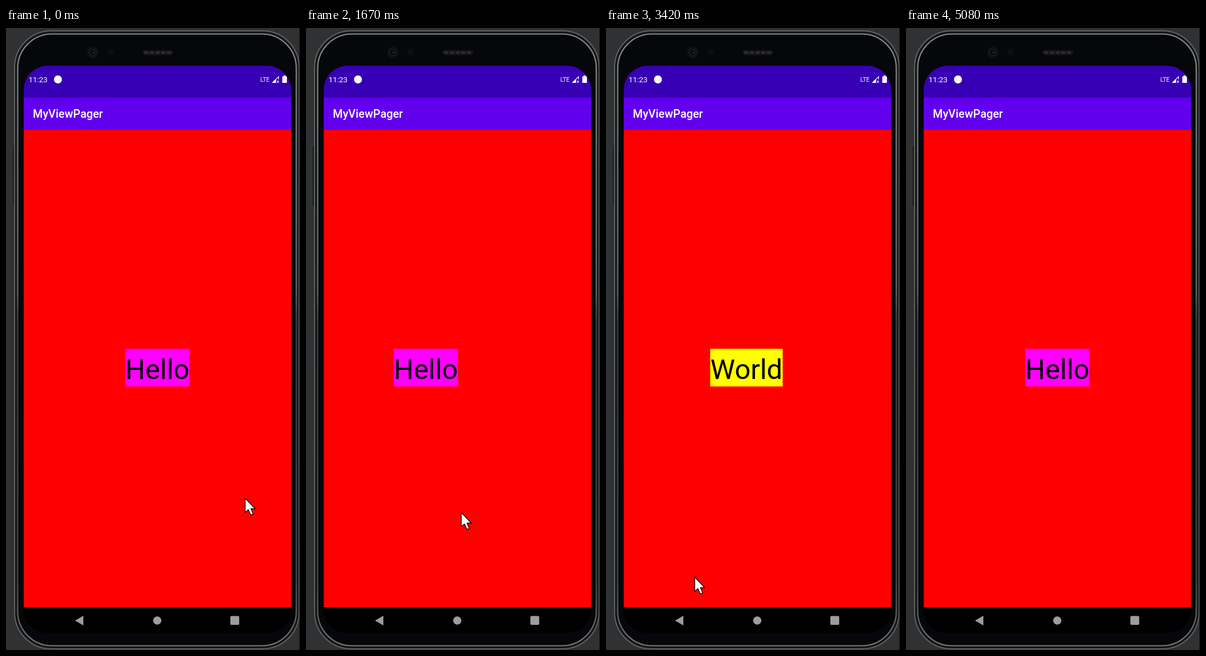
Animation of 515 by 1088 pixels, one loop 5160 ms. Source, as an HTML page:

```html
<!DOCTYPE html>
<html lang="en">
<head>
<meta charset="utf-8">
<title>View pager</title>
<style>
  html, body { margin: 0; width: 100%; height: 100%; overflow: hidden; background: #2f3133; }
  svg { display: block; width: 100%; height: 100%; }
  text { font-family: Roboto, "Open Sans", sans-serif; }
</style>
</head>
<body>
<svg viewBox="0 0 515 1088" preserveAspectRatio="none">
  <defs>
    <clipPath id="screen">
      <path d="M31 108A42 42 0 0 1 73 66H457.5A42 42 0 0 1 499.5 108V1018A40 40 0 0 1 459.5 1058H71A40 40 0 0 1 31 1018Z"/>
    </clipPath>
    <clipPath id="page"><rect x="31" y="178" width="468.5" height="835"/></clipPath>
    <linearGradient id="rim" x1="0" y1="0" x2="0" y2="1">
      <stop offset="0" stop-color="#888a8a"/>
      <stop offset=".42" stop-color="#6a6c6c"/>
      <stop offset=".47" stop-color="#3d3f3f"/>
      <stop offset=".9" stop-color="#484a4a"/>
      <stop offset="1" stop-color="#777977"/>
    </linearGradient>
  </defs>

  <rect width="515" height="1088" fill="#2f3133"/>
  <rect x="10.5" y="204" width="6" height="108" rx="2" fill="#202224" stroke="#3d4042"/>

  <!-- phone body -->
  <rect x="15" y="5" width="498.5" height="1081" rx="64" fill="#151617" stroke="#5f6161" stroke-width="2"/>
  <rect x="20.5" y="10.5" width="488" height="1070" rx="60" fill="#06070a" stroke="url(#rim)" stroke-width="2.2"/>
  <rect x="514" width="1" height="1088" fill="#0a0a0a"/>
  <circle cx="152" cy="43" r="10" fill="#111214"/>
  <circle cx="152" cy="43" r="5" fill="#06070a" stroke="#232427"/>
  <circle cx="153" cy="43" r="1.5" fill="#3a3c40"/>
  <circle cx="183" cy="42" r="6" fill="#0d0e10"/>
  <rect x="239" y="38.5" width="54" height="9" rx="4.5" fill="#141416"/>
  <path d="M242 43H290" stroke="#2d2d2f" stroke-width="4" stroke-dasharray="7 3"/>

  <g clip-path="url(#screen)">
    <rect x="31" y="66" width="469" height="57" fill="#3800b4"/>
    <rect x="31" y="122" width="469" height="56" fill="#6200ee"/>
    <rect x="31" y="178" width="469" height="835" fill="#f00"/>
    <rect x="31" y="1013" width="469" height="46"/>
  </g>

  <g fill="#fff">
    <text x="39.5" y="95" font-size="13.3">11:23</text>
    <circle cx="91" cy="90" r="7"/>
    <text x="445.5" y="94" font-size="10.3">LTE</text>
    <path d="M466 96L473 89V96Z"/>
    <path d="M467 95.5L477.5 85V90M474.5 92L478 96M478 92L474.5 96" fill="none" stroke="#fff" stroke-width="1.1"/>
    <path d="M484 85H486V83H490V85H492V96H484Z"/>
    <text x="47" y="157" font-size="19.9" font-weight="500">MyViewPager</text>
  </g>

  <g id="cards" clip-path="url(#page)" font-size="48.8" text-anchor="middle"></g>

  <g fill="#9d9d9d">
    <path d="M121 1036.5L135.5 1028V1045Z"/>
    <circle cx="265" cy="1036.5" r="7.2"/>
    <rect x="393" y="1028.5" width="15.5" height="15.5" rx="2"/>
  </g>

  <path id="cursor" d="M0 0V25L5.5 20L9.8 29.5L14 27.6L10 18.5H17.5Z"
        fill="#fff" stroke="#000" stroke-width="1.3" stroke-linejoin="round"/>
</svg>
<script>
const LOOP = 5160, STEP = 250 / 3, PAGE = 469, CENTER = 265.2;

const hello = { label: "Hello", width: 112.5, fill: "#f0f" };
const android = { label: "Android", width: 170.5, fill: "#0ff" };
const world = { label: "World", width: 127, fill: "#ff0" };
const pages = [hello, android, world, hello]; // wraps round

// Each swipe turns one page, forward or back.
const swipes = [
  { start: 100, time: 670, turn: 1 },
  { start: 1140, time: 670, turn: -1 },
  { start: 1830, time: 480, turn: 1 },
  { start: 2317, time: 944, turn: 1 },
  { start: 3335, time: 670, turn: 1 }
];

// Resting and turning points of the pointer tip.
const stops = [
  { t: 80, x: 419, y: 822.5 },
  { t: 600, x: 200, y: 829 },
  { t: 1250, x: 241, y: 837.5 },
  { t: 1667, x: 272, y: 847.5 },
  { t: 2417, x: 149, y: 886.5 },
  { t: 3000, x: 299, y: 926.5 },
  { t: 3833, x: 12, y: 994.5 },
  { t: 4000, x: -30, y: 1000 }
];

const ease = u => {
  u = Math.min(1, Math.max(0, u));
  return u * u * (3 - 2 * u);
};

const pageAt = t => swipes.reduce((sum, s) => sum + s.turn * ease((t - s.start) / s.time), 0);

function pointerAt(t) {
  const i = Math.max(1, stops.findIndex(s => s.t > t));
  const done = t >= stops[stops.length - 1].t;
  const [a, b] = done ? stops.slice(-2) : [stops[i - 1], stops[i]];
  const u = ease((t - a.t) / (b.t - a.t));
  return [a.x + (b.x - a.x) * u, a.y + (b.y - a.y) * u];
}

function add(parent, tag, attrs = {}) {
  const el = document.createElementNS("http://www.w3.org/2000/svg", tag);
  for (const key in attrs) el.setAttribute(key, attrs[key]);
  return parent.appendChild(el);
}

const cursor = document.getElementById("cursor");
const layer = document.getElementById("cards");
const cards = pages.map(({ label, width, fill }) => {
  const card = add(layer, "g");
  add(card, "rect", { x: -width / 2, y: 561, width, height: 66, fill });
  add(card, "text", { x: 0, y: 613.5 }).textContent = label;
  return card;
});

const move = (el, x, y) => el.setAttribute("transform", `translate(${x.toFixed(2)} ${y.toFixed(2)})`);

function draw(ms) {
  // The picture advances twelve times a second.
  const t = Math.floor((ms % LOOP + 7) / STEP) * STEP;
  const page = pageAt(t);
  cards.forEach((card, i) => move(card, CENTER + (i - page) * PAGE, 0));
  move(cursor, ...pointerAt(t));
}

const start = performance.now();
function tick() {
  draw(performance.now() - start);
  requestAnimationFrame(tick);
}
tick();
</script>
</body>
</html>
```
